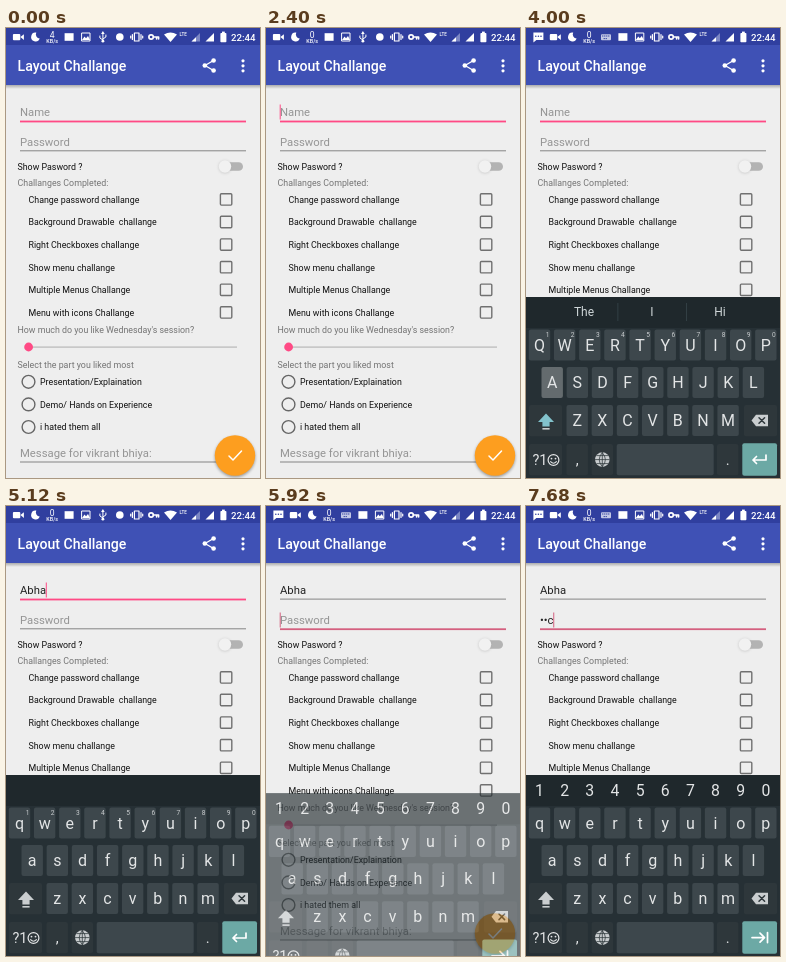
An HTML page for the animation above (8000 ms loop, 254 by 450 pixels).

```html
<!DOCTYPE html>
<html lang="en">
<head>
<meta charset="utf-8">
<title>Layout form</title>
<style>
  html, body { margin: 0; width: 100%; height: 100%; overflow: hidden; background: #eee; }
  svg { display: block; width: 100%; height: 100%; }
  text { font-family: Roboto, sans-serif; white-space: pre; }
  .mid { text-anchor: middle; }
  .line { fill: none; stroke-linecap: round; stroke-linejoin: round; }
</style>
</head>
<body>
<svg id="stage" viewBox="0 0 254 450">
  <defs>
    <linearGradient id="barShade" x2="0" y2="1">
      <stop stop-color="#000" stop-opacity=".28"/>
      <stop offset="1" stop-color="#000" stop-opacity="0"/>
    </linearGradient>
    <filter id="soft" x="-30%" y="-30%" width="160%" height="160%"><feGaussianBlur stdDeviation="1.4"/></filter>
  </defs>
</svg>
<script>
const LOOP = 8000;
const PINK = '#ff4a85';
const stage = document.getElementById('stage');

function add(parent, tag, attrs = {}, content) {
  const node = document.createElementNS('http://www.w3.org/2000/svg', tag);
  for (const name in attrs) node.setAttribute(name, attrs[name]);
  if (content !== undefined) node.textContent = content;
  parent.append(node);
  return node;
}
const group = (parent, x = 0, y = 0) => add(parent, 'g', { transform: `translate(${x} ${y})` });
const rect = (parent, x, y, width, height, fill, rx = 0) =>
  add(parent, 'rect', { x, y, width, height, fill, rx });
const circle = (parent, cx, cy, r, fill) => add(parent, 'circle', { cx, cy, r, fill });
const label = (parent, x, y, size, fill, content, extra) =>
  add(parent, 'text', { x, y, 'font-size': size, fill, ...extra }, content);
const centred = (parent, x, y, size, fill, content) =>
  label(parent, x, y, size, fill, content, { class: 'mid' });
const stroke = (parent, d, color, width) =>
  add(parent, 'path', { d, class: 'line', stroke: color, 'stroke-width': width });
const solid = (parent, d, fill) => add(parent, 'path', { d, fill });
const setText = (node, value) => { if (node.textContent !== value) node.textContent = value; };
const show = (node, on) => node.setAttribute('visibility', on ? 'visible' : 'hidden');
const display = (node, on) => node.setAttribute('display', on ? 'inline' : 'none');

// Form
const SMALL = 8.85;
const form = group(stage);
rect(form, 0, 0, 254, 450, '#eee');

function field(baseline, lineY, hint) {
  return {
    baseline,
    hint: label(form, 14, baseline, 11.3, '#959595', hint),
    value: label(form, 14, baseline, 11.3, '#222', ''),
    line: rect(form, 14, lineY, 226, 1, '#858585'),
  };
}
const nameField = field(88, 92.6, 'Name');
const passField = field(118, 122.3, 'Password');
const caret = rect(form, 14, 0, 1, 15, PINK);

label(form, 11.5, 142, SMALL, '#111', 'Show Pasword ?');
rect(form, 217, 134.2, 20, 8.6, '#b3b3b3', 4.3);
const thumbShade = circle(form, 219, 139, 6.2, '#aaa');
thumbShade.setAttribute('filter', 'url(#soft)');
thumbShade.setAttribute('opacity', .6);
circle(form, 219, 138.5, 6.2, '#f1f1f1');

label(form, 11.5, 157.6, SMALL, '#747474', 'Challanges Completed:');
['Change password challange', 'Background Drawable  challange', 'Right Checkboxes challange',
 'Show menu challange', 'Multiple Menus Challange', 'Menu with icons Challange'].forEach((name, i) => {
  const y = 171.4 + i * 22.6;
  label(form, 22.5, y + 3.4, SMALL, '#111', name);
  add(form, 'rect', { x: 214.4, y: y - 5.7, width: 11.4, height: 11.4, rx: 1,
    fill: 'none', stroke: '#707070', 'stroke-width': 1.4 });
});

label(form, 11.5, 305, SMALL, '#747474', "How much do you like Wednesday's session?");
rect(form, 22, 318.5, 209, 1.2, '#b8b8b8');
circle(form, 22.6, 319, 4.4, PINK);

label(form, 11.5, 340, SMALL, '#747474', 'Select the part you liked most');
['Presentation/Explaination', 'Demo/ Hands on Experience', 'i hated them all'].forEach((name, i) => {
  const y = 353.8 + i * 22.6;
  add(form, 'circle', { cx: 22.5, cy: y, r: 6.4, fill: 'none', stroke: '#666', 'stroke-width': 1.4 });
  label(form, 34, y + 3.4, SMALL, '#111', name);
});
label(form, 14, 429, 11.3, '#959595', 'Message for vikrant bhiya:');
rect(form, 14, 433.5, 226, 1, '#858585');

const shadow = circle(form, 229, 429, 20.2, '#000');
shadow.setAttribute('opacity', .35);
shadow.setAttribute('filter', 'url(#soft)');
circle(form, 229, 427.5, 20.2, '#fd9e1f');
stroke(form, 'M223 428l4 4 8.5-9', '#fff', 1.5);

// App bar
rect(stage, 0, 57, 254, 4, 'url(#barShade)');
rect(stage, 0, 17, 254, 40, '#3f51b5');
label(stage, 11.5, 43, 14.1, '#fff', 'Layout Challange', { 'font-weight': 500 });
stroke(stage, 'M207.5 32.5L199 37.5l8.5 5', '#fff', 1.4);
[[207.6, 32.5], [198.8, 37.5], [207.6, 42.5]].forEach(([x, y]) => circle(stage, x, y, 2.3, '#fff'));
[32.8, 37.8, 42.8].forEach(y => circle(stage, 237, y, 1.6, '#fff'));

// Status bar
rect(stage, 0, 0, 254, 17, '#303f9f');
const icons = {
  chat(g) {
    solid(g, 'M-5-4.5H5V3H-2L-5 5.5Z', '#fff');
    [-2.6, 0, 2.6].forEach(x => circle(g, x, -.8, .8, '#303f9f'));
  },
  camera(g) { rect(g, -5.5, -3, 7.4, 6.2, '#fff', 1); solid(g, 'M2 0L5.5-2.8V3Z', '#fff'); },
  moon(g) { solid(g, 'M1-4.4A4.4 4.4 0 1 0 4.4 1.4A4 4 0 0 1 1-4.4Z', '#fff'); },
  speed(g) {
    g.rate = centred(g, 0, .6, 8.6, '#fff', '0');
    centred(g, 0, 6, 5.4, '#fff', 'KB/s').setAttribute('font-weight', 500);
  },
  keyboard(g) {
    rect(g, -5, -2.8, 10, 6, '#c3c8e4', 1);
    stroke(g, 'M-3.5-1H3.5M-2 1.6H2', '#303f9f', 1).setAttribute('stroke-dasharray', '.5 1.5');
  },
  square(g) { rect(g, -4.5, -3.8, 9, 7.6, '#fff'); },
  picture(g) { stroke(g, 'M-4-4H4V4H-4Z', '#fff', 1); solid(g, 'M-4 3L-1.5-.4 0 1.2 2-1 4 3Z', '#fff'); },
  usb(g) {
    stroke(g, 'M0 4V-4M-3-1V1L0 3M3-2V0L0 2', '#fff', 1);
    solid(g, 'M-1.8-3L0-6 1.8-3Z', '#fff');
    circle(g, 0, 4.2, 1.4, '#fff');
  },
  dot(g) { circle(g, 0, 0, 3.8, '#fff'); },
  vibrate(g) { stroke(g, 'M-2.3-4H2.3V4H-2.3ZM-4.3-2.5V2.5M4.3-2.5V2.5M-6-1V1M6-1V1', '#fff', 1.2); },
  key(g) {
    add(g, 'circle', { cx: -2.5, cy: 0, r: 2.2, fill: 'none', stroke: '#fff', 'stroke-width': 1.7 });
    stroke(g, 'M0 0H5V2M3 0V2', '#fff', 1.6);
  },
};
function iconStrip(names) {
  const strip = group(stage);
  names.forEach((name, i) => {
    const g = group(strip, 12.4 + i * 16.9, 9);
    icons[name](g);
    if (g.rate) strip.rate = g.rate;
  });
  return strip;
}
const idleStrip = iconStrip(['camera', 'moon', 'speed', 'square', 'picture', 'usb', 'dot', 'vibrate', 'key']);
const typingStrip = iconStrip(['chat', 'camera', 'moon', 'speed', 'keyboard', 'square', 'picture', 'vibrate', 'key']);
solid(stage, 'M158 6.5Q164.5 2.5 171 6.5L164.5 14Z', '#fff');
label(stage, 173.4, 8, 4.6, '#fff', 'LTE', { 'font-weight': 500, textAnchor: 'start' });
solid(stage, 'M185.5 13.5H194V5Z', '#7c87c4');
solid(stage, 'M185.5 13.5H190V9.2Z', '#fff');
solid(stage, 'M199.5 13.5H208V5Z', '#fff');
rect(stage, 214.4, 5, 6, 9.2, '#fff', .8);
rect(stage, 216, 3.6, 2.8, 2, '#fff');
label(stage, 249.5, 12.7, 9.7, '#fff', '22:44', { 'text-anchor': 'end', 'font-weight': 500 });

// Keyboard
const INK = '#e3e5e6', DIM = '#c9cdcf', KEY = '#3d474c', SIDE = '#2e373b', PRESSED = '#646b6e';
const board = group(stage);
rect(board, 0, 269, 254, 230, '#263035');
rect(board, 0, 269, 254, 31, '#1f282c');

const hints = group(board);
const hintWords = [58, 126, 194].map(x => centred(hints, x, 288.4, 12, '#cfd6d8', ''));
[91.5, 160].forEach(x => rect(hints, x, 275, .8, 18, '#37454b'));
const superscripts = group(board);
const digits = group(board);

const keys = {};
[['qwertyuiop', 13.5, 317], ['asdfghjkl', 26.2, 354.5], ['zxcvbnm', 51.2, 392.5]].forEach(([letters, x0, y]) => {
  [...letters].forEach((letter, i) => {
    const x = x0 + i * 25.15;
    keys[letter] = {
      cap: rect(board, x - 10.7, y - 15.6, 21.4, 31.2, KEY, 2),
      text: centred(board, x, y + 5.7, 16, INK, letter),
    };
  });
});
[...'1234567890'].forEach((digit, i) => {
  const x = 13.5 + i * 25.15;
  centred(superscripts, x + 8, 308.5, 6.6, DIM, digit);
  centred(digits, x, 289.6, 15.8, INK, digit);
});
board.append(superscripts);

[[3, 377, 33], [218, 377, 33], [3, 416, 33], [40.5, 416, 21.4], [65.6, 416, 21.4], [191, 416, 21.4]]
  .forEach(([x, y, width]) => rect(board, x, y, width, 31.2, SIDE, 2));
rect(board, 90.7, 416, 97, 31.2, KEY, 2);
rect(board, 216.3, 415.2, 34.7, 32.6, '#6ca9a5', 2);

const shiftArrow = solid(board, 'M20 385.6L28 394H23.6V398.5H16.4V394H12Z', DIM);
rect(board, 16.4, 400, 7.2, 1.6, DIM);
solid(board, 'M225.5 392.5L230 386.8H242V398.2H230Z', DIM);
stroke(board, 'M233 389.7l5.6 5.6m0-5.6l-5.6 5.6', SIDE, 1.5);
label(board, 6.5, 437, 14.5, INK, '?1');
add(board, 'circle', { cx: 27.5, cy: 432, r: 5.4, fill: 'none', stroke: INK, 'stroke-width': 1.2 });
circle(board, 25.5, 430.6, .9, INK);
circle(board, 29.5, 430.6, .9, INK);
stroke(board, 'M24.6 433.6Q27.5 436.8 30.4 433.6', INK, 1.1);
centred(board, 51.2, 437, 15, INK, ',');
centred(board, 201.8, 437, 15, INK, '.');
circle(board, 76.3, 431.6, 7.3, DIM);
stroke(board, 'M69.2 431.6H83.4M71 427.6H81.6M71 435.6H81.6M76.3 424.6V438.6M76.3 424.6Q70 431.6 76.3 438.6Q82.6 431.6 76.3 424.6', SIDE, .75);
const enterArrow = stroke(board, 'M240 427V432H227M230.5 428.5L227 432L230.5 435.5', '#fff', 1.7);
const nextArrow = stroke(board, 'M226 431.6H238M234 427.1L238.5 431.6L234 436.1M241.5 426.6V436.6', '#fff', 1.7);

// Timeline: [key, pressed at, typed at]
const NAME_KEYS = [['A', 3960, 4100], ['b', 4220, 4300], ['h', 4400, 4460], ['a', 4560, 4630]];
const PASS_KEYS = [['a', 6960, 7040], ['b', 7280, 7360], ['c', 7530, 7600]];
const ALL_KEYS = [...NAME_KEYS, ...PASS_KEYS];
const SHIFT_AT = 3700, COMMIT_AT = 4900, FOCUS_PASS = 5780;
const OPEN = [3083, 5827], CLOSE = 5180;
const caretResets = [-600, 3050, COMMIT_AT, FOCUS_PASS, ...ALL_KEYS.map(k => k[2])];

const clamp = x => Math.min(1, Math.max(0, x));
const typed = (list, t) => list.filter(k => t >= k[2]).map(k => k[0]).join('');

function setField(f, value, focused, lineColor) {
  setText(f.value, value);
  show(f.hint, !value);
  f.line.setAttribute('fill', focused ? lineColor : '#858585');
  f.line.setAttribute('height', focused ? 1.8 : 1);
}

function drawBoard(t, onPass, name) {
  const open = t >= OPEN[1] ? OPEN[1] : OPEN[0];
  const closing = t >= CLOSE && t < OPEN[1];
  const opacity = closing ? 1 - clamp((t - CLOSE) / 150) : clamp((t - open) / 150);
  const drop = closing ? 47 * clamp((t - CLOSE) / 250) ** 2 : 47 * (1 - clamp((t - open) / 250)) ** 2;
  board.setAttribute('opacity', opacity);
  board.setAttribute('transform', `translate(0 ${drop})`);

  const upper = t >= SHIFT_AT && !name;
  for (const letter in keys) {
    const down = ALL_KEYS.some(([k, from, to]) => k.toLowerCase() === letter && t >= from && t < to);
    keys[letter].cap.setAttribute('fill', down ? PRESSED : KEY);
    setText(keys[letter].text, upper ? letter.toUpperCase() : letter);
  }
  shiftArrow.setAttribute('fill', upper ? '#82c2cc' : DIM);

  let words = upper ? ['The', 'I', 'Hi'] : ['the', 'i', 'hi'];
  if (name) words = ['', name, ''];
  hintWords.forEach((node, i) => setText(node, words[i]));
  display(hints, t < COMMIT_AT);
  display(superscripts, !onPass);
  display(digits, onPass);
  display(enterArrow, !onPass);
  display(nextArrow, onPass);
}

function draw(t) {
  const onPass = t >= FOCUS_PASS;
  const name = typed(NAME_KEYS, t);
  const secret = typed(PASS_KEYS, t);
  setField(nameField, name, !onPass, PINK);
  setField(passField, secret && '•'.repeat(secret.length - 1) + secret.slice(-1), onPass, '#d4607f');

  const active = onPass ? passField : nameField;
  const reset = Math.max(...caretResets.filter(r => r <= t));
  const width = active.value.textContent ? active.value.getComputedTextLength() : 0;
  caret.setAttribute('x', 13.7 + width);
  caret.setAttribute('y', active.baseline - 11.5);
  caret.setAttribute('fill', onPass ? '#d4607f' : PINK);
  show(caret, (t - reset) % 1000 < 500);

  const typing = (t >= 3100 && t < 5080) || t >= 5850;
  display(idleStrip, !typing);
  display(typingStrip, typing);
  setText(idleStrip.rate, t < 1600 ? '4' : '0');
  drawBoard(t, onPass, name);
}

const start = performance.now();
function tick() {
  draw((performance.now() - start) % LOOP);
  requestAnimationFrame(tick);
}
tick();
</script>
</body>
</html>
```
